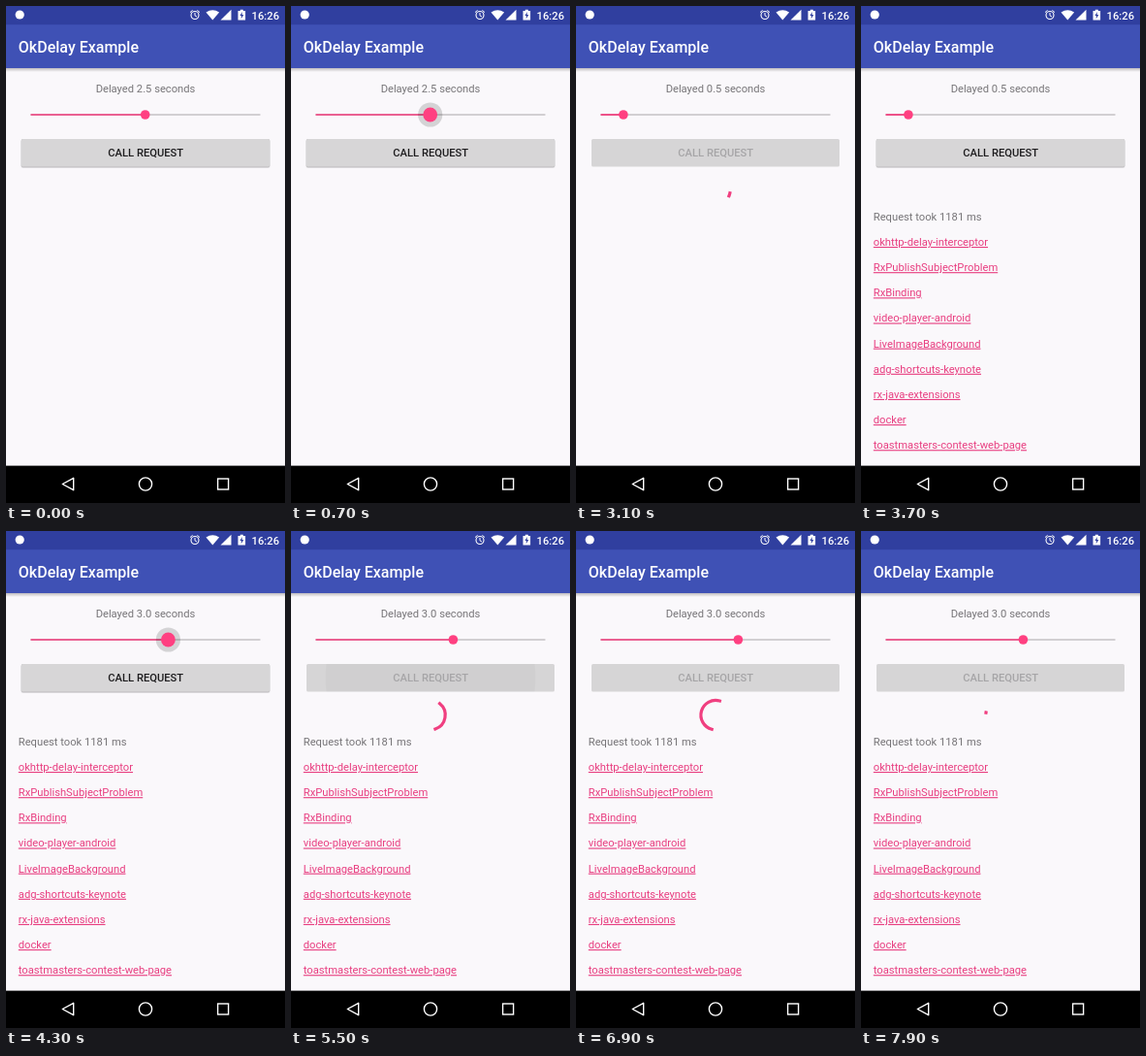
These frames come from a looping animation (288x512 px, 8000 ms). An HTML page:

```html
<!DOCTYPE html>
<html lang="en">
<head>
<meta charset="utf-8">
<title>Delay example</title>
<style>
  html, body { margin: 0; width: 100%; height: 100%; overflow: hidden; background: #faf8fb; }
  svg { display: block; width: 288px; height: 512px; }
  text { font-family: Roboto, "Noto Sans", sans-serif; font-size: 11.2px; }
  .bold { font-weight: 500; }
  .grey { fill: #777578; }
  .link { fill: #e83e80; text-decoration: underline; }
  .line { fill: none; stroke: #fff; stroke-width: 1.4; }
</style>
</head>
<body>
<svg viewBox="0 0 288 512">
  <defs>
    <linearGradient id="shade" x1="0" y1="0" x2="0" y2="1">
      <stop offset="0" stop-color="#000" stop-opacity=".24"/>
      <stop offset="1" stop-color="#000" stop-opacity="0"/>
    </linearGradient>
    <clipPath id="buttonClip"><rect x="16" y="137" width="256" height="28.5" rx="1.6"/></clipPath>
  </defs>
  <rect width="288" height="512" fill="#faf8fb"/>

  <rect y="64" width="288" height="4" fill="url(#shade)"/>
  <rect y="19" width="288" height="45" fill="#3f51b5"/>
  <rect width="288" height="19.2" fill="#303f9f"/>
  <text x="12.8" y="48" class="bold" fill="#fff" style="font-size:16px">OkDelay Example</text>

  <g fill="#fff">
    <circle cx="14.2" cy="9" r="4.6"/>
    <circle cx="195" cy="9.5" r="4" class="line" style="stroke-width:1.1"/>
    <path d="M195 7v2.8l2 1.2M190 6.6l2.6-2.2M200 6.6l-2.6-2.2" class="line" style="stroke-width:1"/>
    <path d="M206.5 6.6Q213.300 1.800 220.100 6.600L213.300 14.600Z"/>
    <path d="M221.500 14.400L232.500 3.800V14.400Z"/>
    <path d="M239.500 4.900H241.800V3.700H244.800V4.900H247.100V14.500H239.500Z"/>
    <path d="M243.900 6L241.400 10H243L242.700 13.300L245.300 9.100H243.600Z" fill="#303f9f"/>
    <text x="282" y="13.500" text-anchor="end" class="bold">16:26</text>
  </g>

  <text id="delay" x="144" y="89" text-anchor="middle" class="grey"></text>
  <path d="M25.500 112H262.500" stroke="#c4c2c5" stroke-width="1.500"/>
  <path id="progress" stroke="#f23c7d" stroke-width="1.700"/>
  <circle id="halo" cy="112" fill="#000"/>
  <circle id="thumb" cy="112" fill="#ff4081"/>

  <g id="shadow">
    <rect x="15.400" y="137" width="257.200" height="30" rx="2" fill="#000" opacity=".1"/>
    <rect x="15.700" y="137" width="256.600" height="29.200" rx="2" fill="#000" opacity=".16"/>
  </g>
  <rect id="button" x="16" y="137" width="256" height="28.500" rx="1.600"/>
  <circle id="ripple" cx="144" cy="151" clip-path="url(#buttonClip)"/>
  <text id="label" x="144.200" y="155.400" text-anchor="middle" class="bold">CALL REQUEST</text>

  <path id="spinner" fill="none" stroke="#f03f80" stroke-width="3.200" stroke-linecap="square"/>
  <g id="result">
    <text x="12.800" y="221" class="grey">Request took 1181 ms</text>
  </g>

  <rect y="473.600" width="288" height="38.400" fill="#000"/>
  <path d="M58.300 492.500L69.700 486.300V498.700Z" class="line" stroke-linejoin="round"/>
  <circle cx="144" cy="492.500" r="6.600" class="line"/>
  <rect x="218.600" y="487" width="11" height="11" class="line"/>
</svg>
<script>
  const LOOP = 8000;
  const $ = id => document.getElementById(id);
  const set = (id, attrs) => {
    for (const key in attrs) $(id).setAttribute(key, attrs[key]);
  };
  const clamp = x => Math.min(1, Math.max(0, x));
  const ramp = (t, from, to) => clamp((t - from) / (to - from));
  const smooth = x => x * x * (3 - 2 * x);

  const drags = [
    { down: 500, from: 650, to: 1050, up: 1350, a: 2.5, b: 0.5 },
    { down: 3860, from: 3950, to: 4280, up: 4750, a: 0.5, b: 3 }
  ];
  const requests = [
    { press: 1790, off: 1880, show: 1950, start: 1940, end: 3200 },
    { press: 5280, off: 5300, show: 5300, start: 5280, end: LOOP }
  ];
  const repos = ["okhttp-delay-interceptor", "RxPublishSubjectProblem", "RxBinding",
    "video-player-android", "LiveImageBackground", "adg-shortcuts-keynote",
    "rx-java-extensions", "docker", "toastmasters-contest-web-page"];

  repos.forEach((name, i) => {
    const row = document.createElementNS("http://www.w3.org/2000/svg", "text");
    row.setAttribute("x", 12.8);
    row.setAttribute("y", 247 + i * 26.15);
    row.setAttribute("class", "link");
    row.textContent = name;
    $("result").append(row);
  });

  // Solves a cubic curve from (x0, 0) to (x3, 1) with level ends for y at x.
  function curve(x, x0, x1, x2, x3) {
    if (x <= x0) return 0;
    if (x >= x3) return 1;
    let lo = 0, hi = 1;
    for (let i = 0; i < 20; i++) {
      const s = (lo + hi) / 2, r = 1 - s;
      const at = r * r * r * x0 + 3 * r * r * s * x1 + 3 * r * s * s * x2 + s * s * s * x3;
      if (at < x) lo = s; else hi = s;
    }
    return smooth(lo);
  }

  function arc(age) {
    const u = age % 1333 / 1333;
    const base = age * 720 / 6665 + 90 * u;
    const head = base + 270 * curve(u, 0, 0.2, 0.1, 0.5);
    const tail = base + 270 * curve(u, 0.5, 0.7, 0.6, 1);
    const point = deg => {
      const a = deg * Math.PI / 180;
      return (144 + 15.2 * Math.sin(a)).toFixed(2) + " " + (189.6 - 15.2 * Math.cos(a)).toFixed(2);
    };
    const end = Math.max(head, tail + 0.5);
    return `M${point(tail)}A15.2 15.2 0 ${end - tail > 180 ? 1 : 0} 1 ${point(end)}`;
  }

  function drawSlider(t) {
    let value = 2.5, touch = 0;
    for (const d of drags) {
      if (t < d.down) break;
      const raw = d.a + (d.b - d.a) * smooth(ramp(t, d.from, d.to));
      value = Math.round(raw * 2) / 2;
      touch = ramp(t, d.down, d.down + 150) * (1 - ramp(t, d.up, d.up + 250));
    }
    const x = 25.2 + value * 47.4;
    $("delay").textContent = `Delayed ${value.toFixed(1)} seconds`;
    set("progress", { d: `M25.5 112H${x}` });
    set("thumb", { cx: x, r: 4.8 + 2.6 * touch });
    set("halo", { cx: x, r: 6 + 6.6 * Math.sqrt(touch), opacity: 0.15 * touch });
  }

  function drawRequest(t) {
    const off = requests.some(r => t >= r.off && t < r.end);
    const busy = requests.find(r => t >= r.show && t < r.end);
    const pressed = requests.find(r => t >= r.press && t < r.press + 400);
    const age = pressed ? t - pressed.press : 400;
    set("button", { fill: off ? "#d6d5d6" : "#d7d6d7" });
    set("shadow", { opacity: off ? 0 : 1 });
    set("label", { fill: off ? "#a6a5a7" : "#1d1c1e" });
    set("ripple", { r: 20 + age * 0.4, opacity: 0.07 * (1 - ramp(age, 80, 320)) });
    set("spinner", { d: busy ? arc(t - busy.start) : "" });
    set("result", { visibility: t >= requests[0].end ? "visible" : "hidden" });
  }

  function draw(t) {
    drawSlider(t);
    drawRequest(t);
  }

  const begin = performance.now();
  function tick() {
    draw((performance.now() - begin) % LOOP);
    requestAnimationFrame(tick);
  }
  draw(0);
  requestAnimationFrame(tick);
</script>
</body>
</html>
```
